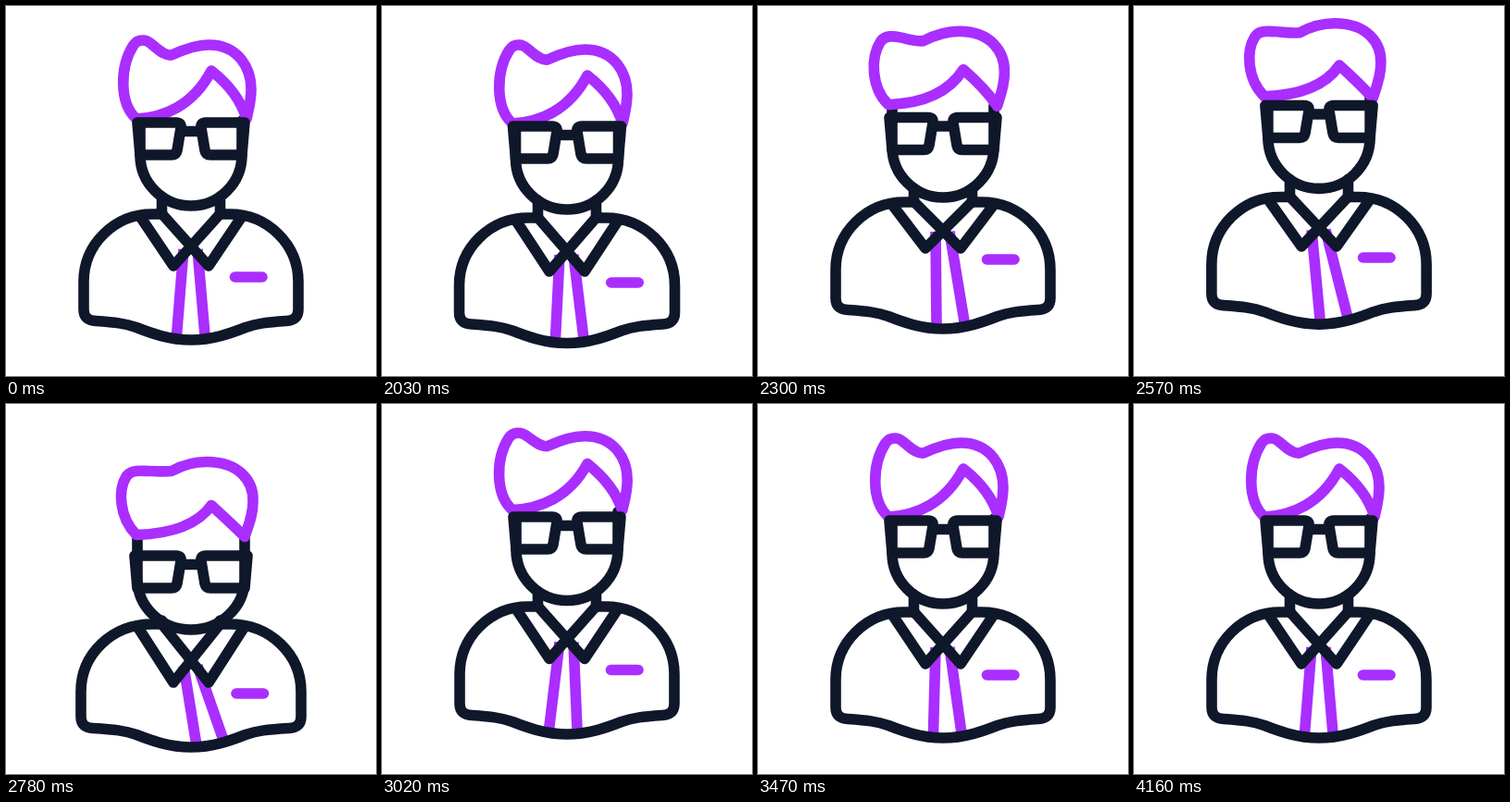
These frames come from a looping animation (400x400 px, 4.19 s). An HTML page:

```html
<!DOCTYPE html>
<html lang="en">
<head>
<meta charset="utf-8">
<title>Jumping man with glasses</title>
<style>
  html, body { margin: 0; width: 100%; height: 100%; overflow: hidden; background: #fff; }
  svg { display: block; width: 100vw; height: 100vh; }
  path { fill: none; stroke: #0f172a; stroke-width: 11.6; stroke-linecap: round; stroke-linejoin: round; }
  .accent { stroke: #a92eff; }
  #tie { stroke-linecap: butt; }
</style>
</head>
<body>
<svg viewBox="0 0 400 400">
  <path id="tie" class="accent"/>
  <path id="pocket" class="accent"/>
  <path id="neck"/>
  <path id="body"/>
  <path id="collar"/>
  <path id="head"/>
  <path id="hair" class="accent"/>
  <path id="glasses"/>
</svg>
<script>
const LOOP = 4190, START = 2030, STEP = 30;

// Columns: time, vertical shifts of the parts, hair flattening, extra half width.
const PARTS = ['body', 'shoulder', 'collar', 'head', 'glasses', 'hair', 'flat', 'wide'];
const POSES = [
  [2000, 0, 0, 0, 0, 0, 0, 0, 0],
  [2030, 3.5, 4, 6, 4, 4, 5, 0, 0.5],
  [2130, 10, 13, 18, 18, 22, 16, 0.4, 2],
  [2300, -12, -13, -19, -9, -5.5, -16, 0.7, 0],
  [2440, -26, -28, -36, -29, -24, -34, 0.8, 0],
  [2540, -20, -22, -26, -23, -22, -29, 0.9, 0],
  [2780, 10, 13, 20, 28, 38, 18.5, 1, 3],
  [3020, -4, -6, -5.5, -3.5, -4, -7.5, 0.1, 0],
  [3240, 2, 2, 3, 2, 2, 2, 0, 0],
  [3460, 0, 0, 0, 0, 0, 0, 0, 0]
];
const SWAY = [
  [2000, 0], [2030, 3], [2130, 7], [2300, 8.5], [2780, 21], [3020, -4],
  [3150, -16], [3470, 5], [3540, 8], [3810, -14], [4160, 0]
];

const HAIR = 'M141 122 C122 105 123 65 138 42 C143 35 152 36 157 41 C165 47 171 54 179 53 ' +
  'C190 48 205 42 219 42 C252 42 265 68 265 90 C265 103 262 113 260 122 ' +
  'C254 102 240 84 222 70 C202 108 170 121 141 122 Z';
const FLAT_HAIR = 'M141 123 C122 104 121 74 130 60 C135 52 145 54 154 54 C162 54 171 55 179 54 ' +
  'C190 48 205 44 217 44 C252 44 268 65 267 87 C267 102 262 113 258 125 ' +
  'C247 114 234 102 222 91 C205 115 172 122 141 123 Z';
const flatValues = FLAT_HAIR.match(/\d+/g).map(Number);

// Smooth curve through the keys that comes to rest at every turning point.
function slope(keys, i, col) {
  if (i === 0 || i === keys.length - 1) return 0;
  const rate = j => (keys[j + 1][col] - keys[j][col]) / (keys[j + 1][0] - keys[j][0]);
  const a = rate(i - 1), b = rate(i);
  return a * b > 0 ? 2 * a * b / (a + b) : 0;
}

function track(keys, col, t) {
  const last = keys.length - 1;
  if (t <= keys[0][0]) return keys[0][col];
  if (t >= keys[last][0]) return keys[last][col];
  const i = keys.findIndex(k => k[0] > t) - 1;
  const [p, q] = [keys[i], keys[i + 1]];
  const span = q[0] - p[0], u = (t - p[0]) / span, v = 1 - u;
  return p[col] * v * v * (1 + 2 * u) + q[col] * u * u * (3 - 2 * u) +
    span * u * v * (v * slope(keys, i, col) - u * slope(keys, i + 1, col));
}

function set(id, d, transform = '') {
  const el = document.getElementById(id);
  el.setAttribute('d', d);
  el.setAttribute('transform', transform);
}

// Calls the drawing for the left side and its mirror image.
const bothSides = draw => draw(x => x) + draw(x => 400 - x);

function hairPath(flat) {
  let i = 0;
  return HAIR.replace(/\d+/g, n => {
    const value = +n + (flatValues[i++] - n) * flat;
    return value.toFixed(2);
  });
}

function render(time) {
  const t = time < START ? 0 : START + STEP * Math.floor((time - START) / STEP);
  const p = {};
  PARTS.forEach((name, i) => { p[name] = track(POSES, i + 1, t); });
  const sway = track(SWAY, 1, t);
  const w = p.wide, top = p.shoulder, low = p.body;

  set('tie', `M192 ${263 + p.collar} L${184.5 + sway} ${356 + low}` +
    `M207 ${263 + p.collar} L${215 + sway} ${356 + low}`);
  set('pocket', `M${247.5 + w / 2} ${293 + p.collar} h29.5`);
  set('neck', bothSides(x => `M${x(168.5)} ${206 + p.head} V${224 + top}`));
  set('body', bothSides(x =>
    `M${x(168)} ${225 + top} H${x(158)}` +
    `C${x(117 - w)} ${225 + top} ${x(84 - w)} ${258 + top} ${x(84 - w)} ${298 + top}` +
    `V${328 + low} Q${x(84 - w)} ${340 + low} ${x(97 - w)} ${340.5 + low}` +
    `C${x(118)} ${342 + low} ${x(128)} ${343 + low} ${x(141)} ${347.5 + low}` +
    `C${x(155)} ${353 + low} ${x(176)} ${361 + low} 200 ${361 + low}`));
  set('collar', bothSides(x =>
    `M${x(146 - w)} ${229 + top} L${x(181)} ${281 + p.collar} L${x(233)} ${223 + top}`));
  set('head', `M${145 - w} ${124 + p.hair} V${161 + p.head}` +
    `A${55 + w} 55 0 0 0 ${255 + w} ${161 + p.head} V${124 + p.hair}`);
  set('hair', hairPath(p.flat), `translate(0 ${p.hair})`);
  set('glasses', bothSides(x =>
    `M${x(142 - w)} 126 H${x(184)} Q${x(190)} 126 ${x(189)} 132 L${x(185)} 156` +
    `Q${x(184)} 161 ${x(179)} 161 H${x(145 - w)} Z`) + 'M190 135.5 H210',
    `translate(0 ${p.glasses})`);
}

const begin = performance.now();
function frame() {
  render((performance.now() - begin) % LOOP);
  requestAnimationFrame(frame);
}
frame();
</script>
</body>
</html>
```
